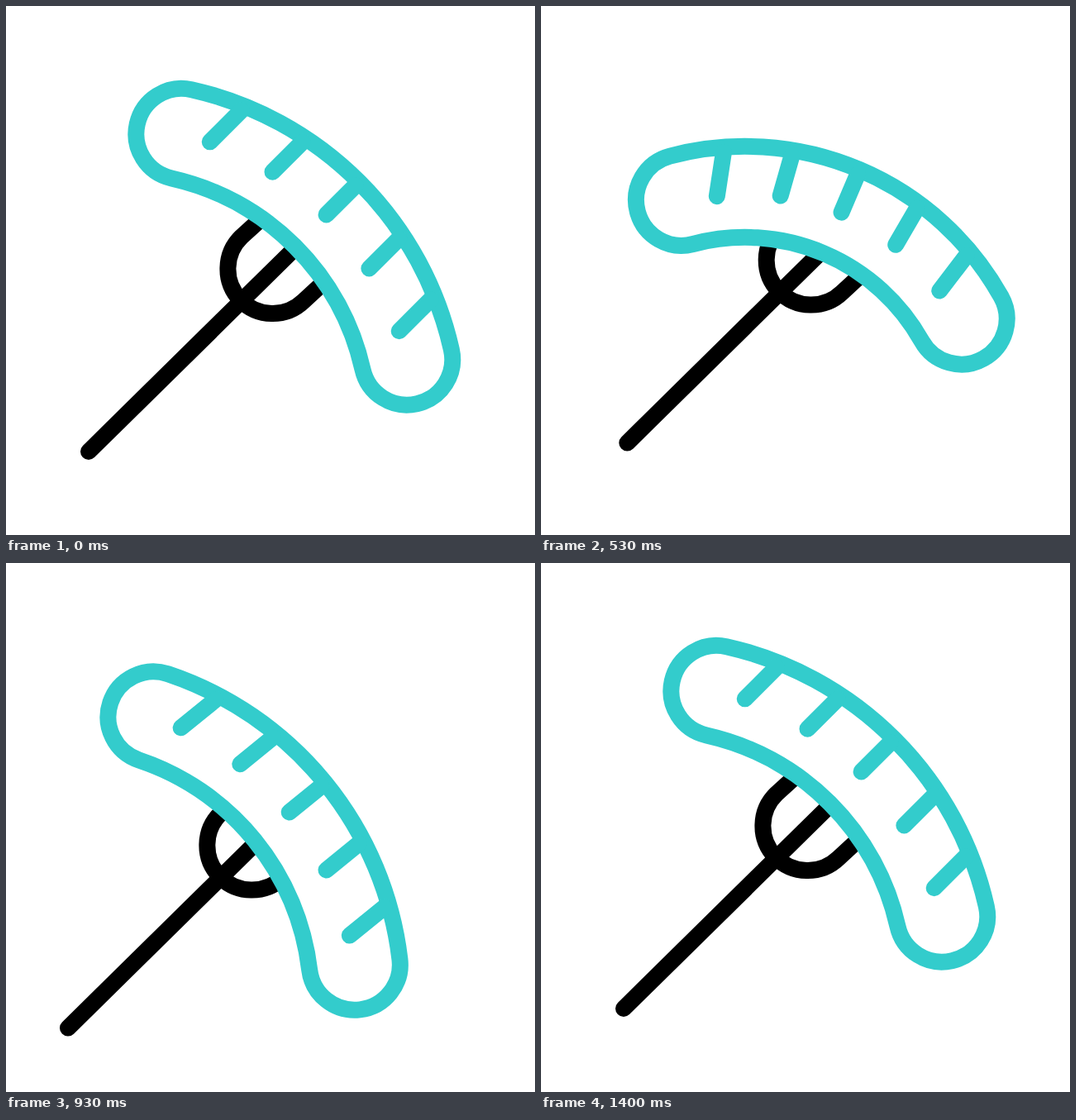
An HTML page that plays this animation: 640 px wide and 640 px high, repeating every 2000 ms.

```html
<!DOCTYPE html>
<html>
<head>
<meta charset="utf-8">
<title>Sausage on a fork</title>
<style>
  html, body { margin: 0; height: 100%; overflow: hidden; background: #fff; }
  svg { display: block; width: 100vw; height: 100vh; fill: none; stroke-width: 20; stroke-linecap: round; }
</style>
</head>
<body>
<svg viewBox="0 0 640 640">
  <g id="fork" stroke="#000">
    <path d="M100 539L364 279M318 249L285 279A54.1 54.1 0 0 0 360 357L400 320"/>
    <g id="sausage" stroke="#33cccc">
      <path id="skin" fill="#fff"/>
      <path id="cuts"/>
    </g>
  </g>
</svg>
<script>
const FPS = 30, LOOP = 2000, LAST_FRAME = 42;
const THICK = 55;        // half the sausage's thickness
const HALF_LENGTH = 203.5;
const HALF_ARC = 32.3;   // degrees from the middle to an end, at rest

const $ = id => document.getElementById(id);
const rad = deg => deg * Math.PI / 180;

// [frame, dx, dy]
const forkKeys = [[0, 0, 0], [9.7, -62, 65], [20.1, 39, -50], [31.3, -42, 43], [LAST_FRAME, 0, 0]];

// [frame, slide down the fork, turn in degrees, extra bend in degrees]
const sausageKeys = [
  [0, 0, 0, 0],
  [11, 39, -12.8, 10],
  [16, 16, -22, 5.5],
  [19.5, 3, -15, 0],
  [23, 5.5, -1.2, 0],
  [28, 22.5, 5.9, 0],
  [37, 5, -1.6, 0],
  [LAST_FRAME, 0, 0, 0]
];

// Monotone cubic interpolation: flat at every turning point.
function sample(keys, t) {
  let i = 0;
  while (i < keys.length - 2 && t >= keys[i + 1][0]) i++;
  const from = keys[i], to = keys[i + 1];
  const span = to[0] - from[0], p = (t - from[0]) / span, q = 1 - p;
  const slope = (k, n) => (keys[k + 1][n] - keys[k][n]) / (keys[k + 1][0] - keys[k][0]);
  const tangent = (k, n) => {
    if (k === 0 || k === keys.length - 1) return 0;
    const a = slope(k - 1, n), b = slope(k, n);
    return a * b > 0 ? 2 * a * b / (a + b) : 0;
  };
  return from.slice(1).map((v, j) => {
    const n = j + 1;
    return v + (to[n] - v) * p * p * (3 - 2 * p)
      + span * p * q * (q * tangent(i, n) - p * tangent(i + 1, n));
  });
}

// The sausage follows an arc whose middle is the local origin, outer side up.
function drawSausage([slide, turn, bend]) {
  const arc = HALF_ARC + bend;
  const radius = (HALF_LENGTH - bend) / rad(arc);
  const outer = radius + THICK, inner = radius - THICK;
  const point = (r, deg) => [r * Math.sin(rad(deg)), radius - r * Math.cos(rad(deg))];

  $('skin').setAttribute('d', `M${point(outer, -arc)}
    A${outer} ${outer} 0 0 1 ${point(outer, arc)}
    A${THICK} ${THICK} 0 0 1 ${point(inner, arc)}
    A${inner} ${inner} 0 0 0 ${point(inner, -arc)}
    A${THICK} ${THICK} 0 0 1 ${point(outer, -arc)}Z`);

  let cuts = '';
  for (let i = -2; i <= 2; i++) {
    const length = 50 + i * i, lean = rad(1.3 * bend * i);
    cuts += `M${point(outer - 6, 0.36 * arc * i)}l${-length * Math.sin(lean)} ${length * Math.cos(lean)}`;
  }
  $('cuts').setAttribute('d', cuts);

  $('sausage').setAttribute('transform',
    `translate(${360 - slide} ${280 + slide}) rotate(${45 + turn}) translate(0 -40)`);
}

function draw(ms) {
  const frame = Math.min(LAST_FRAME, Math.floor((ms % LOOP + 5) * FPS / 1000));
  $('fork').setAttribute('transform', `translate(${sample(forkKeys, frame)})`);
  drawSausage(sample(sausageKeys, frame));
}

const start = performance.now();
function tick() {
  draw(performance.now() - start);
  requestAnimationFrame(tick);
}
tick();
</script>
</body>
</html>
```
